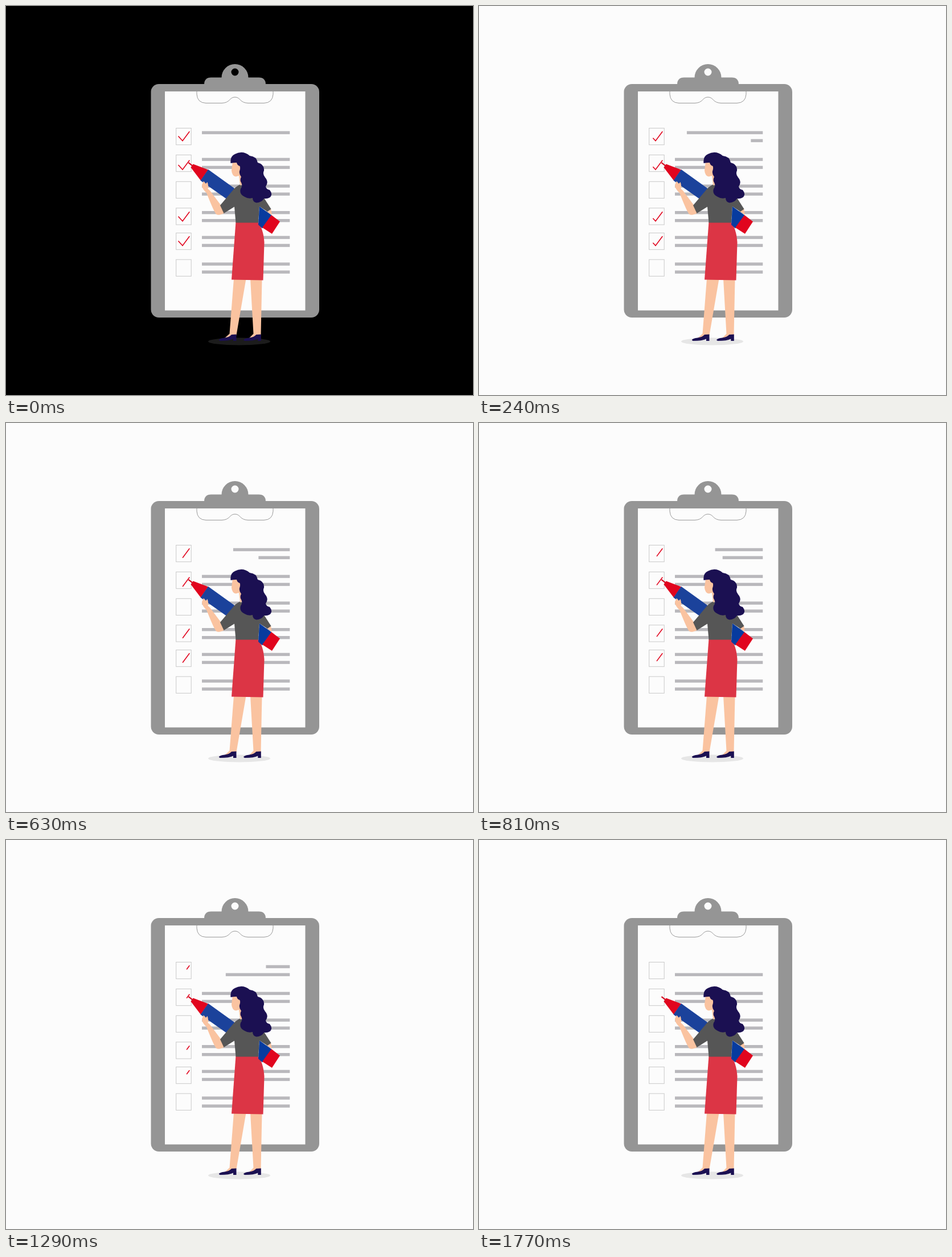
An HTML page for the animation above (1.83 s loop, 820 by 683 pixels).

```html
<!DOCTYPE html>
<html lang="en">
<head>
<meta charset="utf-8">
<title>Checklist</title>
<style>
  html, body { margin: 0; width: 100%; height: 100%; overflow: hidden; }
  svg { display: block; width: 820px; height: 683px; background: #fcfcfc; }
  .skin { fill: #fac3a0; }
  .navy { fill: #1b1052; }
  .red { fill: #e1051e; }
</style>
</head>
<body>
<svg id="stage" viewBox="0 0 820 683">
  <defs>
    <path id="shoe" d="M374 587Q373 584 384 582.500Q392 581.500 396 577L404.500 576.500V588H399V584.500Q392 588 376 588Z"/>
  </defs>

  <!-- clipboard -->
  <rect x="254.500" y="137" width="295.500" height="410" rx="14" fill="#959595"/>
  <path fill="#959595" fill-rule="evenodd" d="M348 138Q348 125.500 360 125.500H378.500A23.500 23.500 0 0 1 425.500 125.500H444Q456 125.500 456 138ZM395.500 116a6.500 6.500 0 1 0 13 0a6.500 6.500 0 1 0 -13 0Z"/>
  <rect x="279" y="150" width="246.500" height="384.500" fill="#fcfcfc"/>
  <path fill="none" stroke="#999" d="M335 150V155Q336 170 351 170.500H379C394 170 392 160 402 160C412 160 410 170 425 170.500H453Q468 170 469 155V150"/>
  <g id="lines" fill="#b9b8bc"></g>
  <g id="boxes" fill="none" stroke="#c9c9c9"></g>
  <g id="checks" fill="none" stroke="#e1051e" stroke-width="1.600"></g>

  <!-- pencil -->
  <path d="M320.500 275.200L328 281" stroke="#d2051e" stroke-width="2.200"/>
  <path class="red" d="M328.500 277.500L355 287.500L342 306.500L324.500 283.500Z"/>
  <path fill="#1b429b" d="M355 287L403 321.500L389 340L341.500 306.500Z"/>

  <!-- legs -->
  <ellipse cx="409.500" cy="589" rx="54.500" ry="6.500" fill="#8c8c8c" fill-opacity=".2"/>
  <path class="skin" d="M400 479H421.500L404.500 578L398 582L384 583L392.500 575.500Z"/>
  <path class="skin" d="M429 479H449.500L447.500 578L441 582L427 583L434.500 575.500Z"/>
  <use href="#shoe" class="navy"/>
  <use href="#shoe" class="navy" x="43.300"/>

  <!-- body -->
  <path fill="#dc3545" d="M403.500 379H442Q452 391 453.500 415L451.500 481.500L396 480.500Z"/>
  <path class="skin" d="M455 358L465 355.500L467 367Z"/>
  <path class="skin" d="M376 348L384 363Q374 369 369 365.500Q365 361 352 328Q344 321 344 314L347 307.500L351 312L353.500 309Q356 315 354.500 321L358 324Z"/>
  <path fill="#565656" d="M411 313.500Q403 317 398 324L376 350L382.500 364L401 352.500L403.500 380.500H443L445 352L459 361L465.500 356.500L453 337Z"/>
  <path fill="#073b9f" d="M445 352L466.500 367.500L450 390.500L443 384Z"/>
  <path class="red" d="M466 367L481 378.500L467 400L450 389Z"/>

  <!-- head -->
  <path class="skin" d="M398 273L396 289Q397 299 404 299.500L409 298L411 315L418 312V273Z"/>
  <path class="navy" d="M394.500 276Q393 264 402 260Q416 253 428 263Q440 264 442 275Q454 278 453 289Q450 295 455 301Q462 309 456 317Q457 322 463 323Q467 328 466 332Q464 339 453 338Q449 345 440 345.500Q433 344 433 337Q425 339 419 335Q409 330 412 321Q416 316 413 310Q410 306 413 300Q409 295 410 290Q412 285 410.500 281Q406 280 405 275Q400 275 394.500 276Z"/>
</svg>
<script>
const LOOP = 1830, STEP = 30, LAST = 1770;
const LEFT = 344, RIGHT = 498.3;
const stage = document.getElementById('stage');

function add(parent, tag, attrs) {
  const node = document.createElementNS('http://www.w3.org/2000/svg', tag);
  for (const key in attrs) node.setAttribute(key, attrs[key]);
  return document.getElementById(parent).appendChild(node);
}

const bars = [];
for (const y of [214.5, 261.5, 308.3, 354.8, 398.5, 445.2]) {
  add('boxes', 'rect', { x: 298.7, y, width: 26.5, height: 29.2 });
  for (const dy of [5.2, 19.2])
    bars.push(add('lines', 'rect', { x: LEFT, y: y + dy, width: RIGHT - LEFT, height: 5.4 }));
}
const [upper, lower] = bars;

const checks = [0, 50.5, 141, 184].map(dy => add('checks', 'path', {
  d: `M302.5 ${228.5 + dy}L310 ${236.8 + dy}L322.3 ${220.3 + dy}`,
  pathLength: 1, 'stroke-dasharray': '1 2'
}));

function setLeft(bar, x) {
  bar.setAttribute('x', x);
  bar.setAttribute('width', RIGHT - x);
}

function draw(now) {
  const t = Math.min(Math.floor(now % LOOP / STEP) * STEP, LAST);
  const p = t / LAST;
  stage.style.background = t ? '#fcfcfc' : '#000';
  setLeft(upper, LEFT + (RIGHT - LEFT) * p);
  setLeft(lower, RIGHT - (RIGHT - LEFT) * p);
  for (const check of checks) {
    check.setAttribute('stroke-dashoffset', -p);
    check.setAttribute('visibility', p < 1 ? 'visible' : 'hidden');
  }
}

const start = performance.now();
function tick() {
  draw(performance.now() - start);
  requestAnimationFrame(tick);
}
tick();
</script>
</body>
</html>
```
